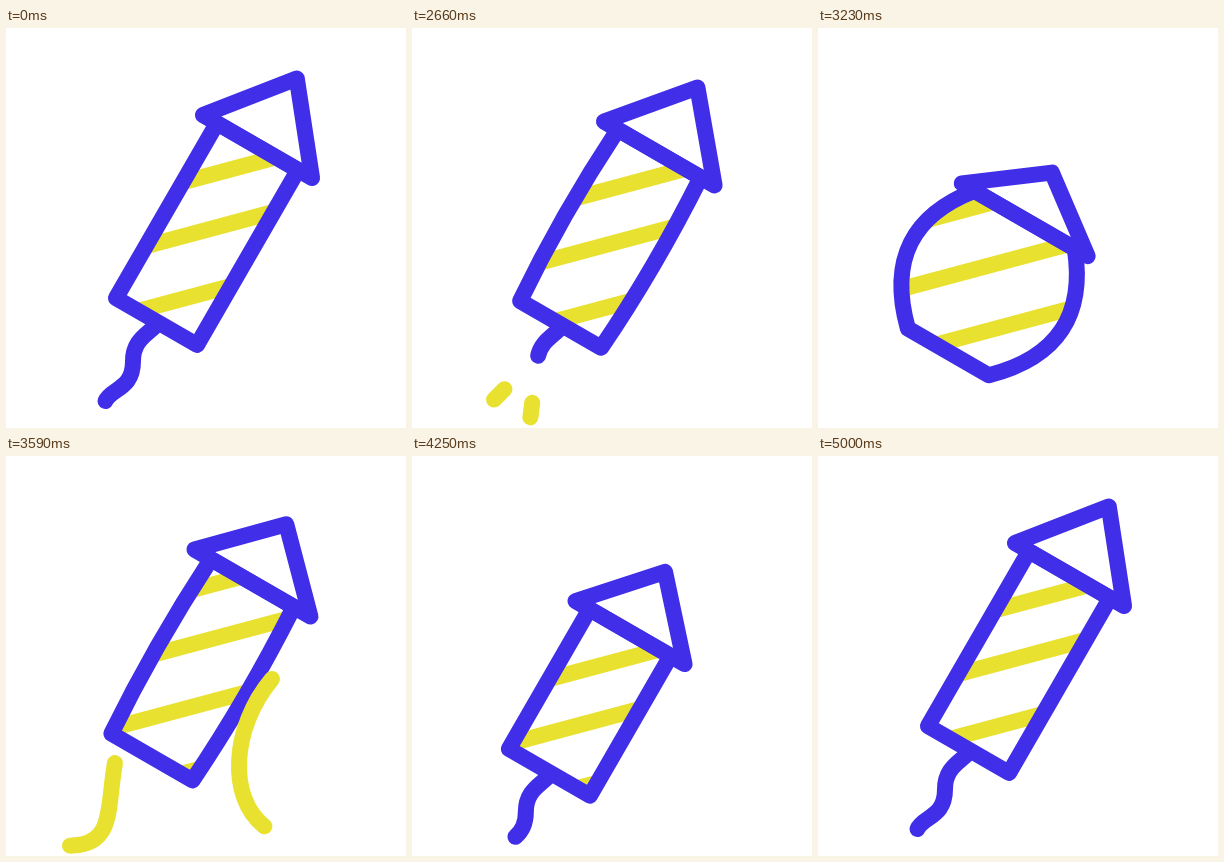
An HTML page that plays this animation: 400 by 400 pixels, repeating every 5.03 s.

```html
<!DOCTYPE html>
<html lang="en">
<head>
<meta charset="utf-8">
<title>Rocket</title>
<style>
  html, body { margin: 0; width: 100%; height: 100%; overflow: hidden; background: #fff; }
  svg { display: block; width: 100%; height: 100%; }
  path { fill: none; stroke-width: 16; stroke-linecap: round; stroke-linejoin: round; }
  .blue { stroke: #402ee8; }
  .yellow { stroke: #e8e130; }
</style>
</head>
<body>
<svg viewBox="0 0 400 400">
  <defs><clipPath id="inside"><path id="clipShape"/></clipPath></defs>
  <path id="sparks" class="yellow"/>
  <path id="fuse" class="blue" d="M151 296C143 306 127 311 127 333C127 362 105 360 99.5 373"/>
  <g id="rocket">
    <g clip-path="url(#inside)"><path id="stripes" class="yellow"/></g>
    <path id="body" class="blue"/>
    <path id="hat" class="blue"/>
  </g>
  <path class="yellow smoke" d="M109 307C101 350 109 388 67 389.500C30 392 10 372 10 345C10 303 77 300 79 338C80 356 74 367 62 368C37 371 30 341 54 338"/>
  <path class="yellow smoke" d="M266 223C225 272 222 342 258 370C290 395 378 395 378 338C378 266 288 268 288 325C288 345 297 353 310 356C347 367 367 329 333 315"/>
</svg>
<script>
const LOOP = 5030, START = 2030, STEP = 30;
const RETURN = 3700, END = 5000;
const SPARK_CYCLE = 358;
const STRIPES = [273.5, 180.6, 106.8, 21.4, -66];
const SPREAD = [0, 0, 8.5, 11, 11];

const el = id => document.getElementById(id);
const clamp = x => Math.min(1, Math.max(0, x));
const span = (t, a, b) => clamp((t - a) / (b - a));
const smooth = x => x * x * (3 - 2 * x);

const fuse = el('fuse');
const fuseLength = fuse.getTotalLength();
const smokes = [...document.querySelectorAll('.smoke')];

// Show the part of a path between the fractions a and b.
function trim(path, a, b) {
  path.style.display = b > a ? '' : 'none';
  const len = path.getTotalLength();
  path.style.strokeDasharray = `${Math.max(0, b - a) * len} ${3 * len}`;
  path.style.strokeDashoffset = -a * len;
}

// Heights run along the rocket's axis, measured from its resting base.
function pose(t) {
  if (t >= RETURN) {
    const e = ((END - t) / 990) ** 3;
    const top = 202 - 154 * e;
    return {
      top, base: Math.min(-60.5 * e, top - 36),
      width: 126, height: 78.6 - 19.6 * e, bulge: 0, spread: 0,
      drop: 183 * e, fuse: clamp(1 - 0.55 * e)
    };
  }
  const squash = 1.3 * smooth(span(t, 2545, 3150));
  const lift = t > 3400 ? ((t - 3400) / 190) ** 5 : 0;
  const relax = rate => squash * Math.max(0, 1 - rate * lift);
  const fall = 66 * squash - 76 * lift;
  return {
    top: 202 - fall,
    base: 38 * relax(0.98) - fall,
    width: 126 + 15 * relax(0.59),
    height: 78.6 - 18.6 * relax(0.55),
    bulge: relax(0.91),
    spread: relax(0.98),
    drop: 29 * smooth(span(t, START, 3150)) - 53 * lift,
    fuse: t < START ? 1 : clamp(0.97 - (t - START) * 0.86 / 930)
  };
}

function drawRocket(p) {
  const { top, base, width, height, bulge } = p;
  const foot = 46.8, neck = foot + 8.5 * bulge, belly = foot + 40 * bulge;
  const low = -(base + (top - base) / 3), high = -(base + (top - base) * 2 / 3);
  const shape = `M${-foot} ${-base}C${-belly} ${low} ${-belly} ${high} ${-neck} ${-top}` +
    `H${neck}C${belly} ${high} ${belly} ${low} ${foot} ${-base}Z`;
  el('rocket').setAttribute('transform', `translate(150.5 293.5) rotate(30) translate(${-1.7 * bulge} 0)`);
  el('body').setAttribute('d', shape);
  el('clipShape').setAttribute('d', shape);
  el('hat').setAttribute('d', `M${-width / 2} ${-top}L0 ${-top - height}L${width / 2} ${-top}Z`);
  el('stripes').setAttribute('d', STRIPES.map((u, i) =>
    `M-150 ${150 - u + p.drop + SPREAD[i] * p.spread}l300 -300`).join(''));
}

function ray(x, y, degrees, from, to) {
  if (to <= from) return '';
  const c = Math.cos(degrees * Math.PI / 180), s = Math.sin(degrees * Math.PI / 180);
  return `M${x + c * from} ${y + s * from}L${x + c * to} ${y + s * to}`;
}

function drawSparks(t, x, y) {
  let d = '';
  if (t >= START && t < 3110) {
    const q = ((t - START) / SPARK_CYCLE + 0.15) % 1;
    const mid = 106 + 15 * span(t, START, 2960);
    const wide = 87 - 41 * span(q, 0.15, 0.75);
    for (const side of [-1, 1]) {
      d += ray(x, y, mid + side * wide, Math.max(0, 120 * (q - 0.3)), 5 + 73 * q);
      d += ray(x, y, mid + side * 19, Math.max(0, 250 * (q - 0.72)), 102 * (q - 0.3));
    }
  }
  el('sparks').setAttribute('d', d);
}

function drawSmoke(t) {
  const head = 1 - (1 - span(t, 3560, 3850)) ** 3;
  const tail = 1 - (1 - span(t, 3590, 4260)) ** 2;
  smokes.forEach(path => trim(path, tail, head));
}

function draw(t) {
  const p = pose(t);
  const dx = p.base * 0.5, dy = -p.base * 0.866;
  drawRocket(p);
  trim(fuse, 0, p.fuse);
  fuse.setAttribute('transform', `translate(${dx} ${dy})`);
  const tip = fuse.getPointAtLength(p.fuse * fuseLength);
  drawSparks(t, tip.x + dx, tip.y + dy);
  drawSmoke(t);
}

const origin = performance.now();
function tick() {
  const t = (performance.now() - origin) % LOOP;
  draw(t < START ? 0 : START + Math.floor((t - START) / STEP) * STEP);
  requestAnimationFrame(tick);
}
tick();
</script>
</body>
</html>
```
